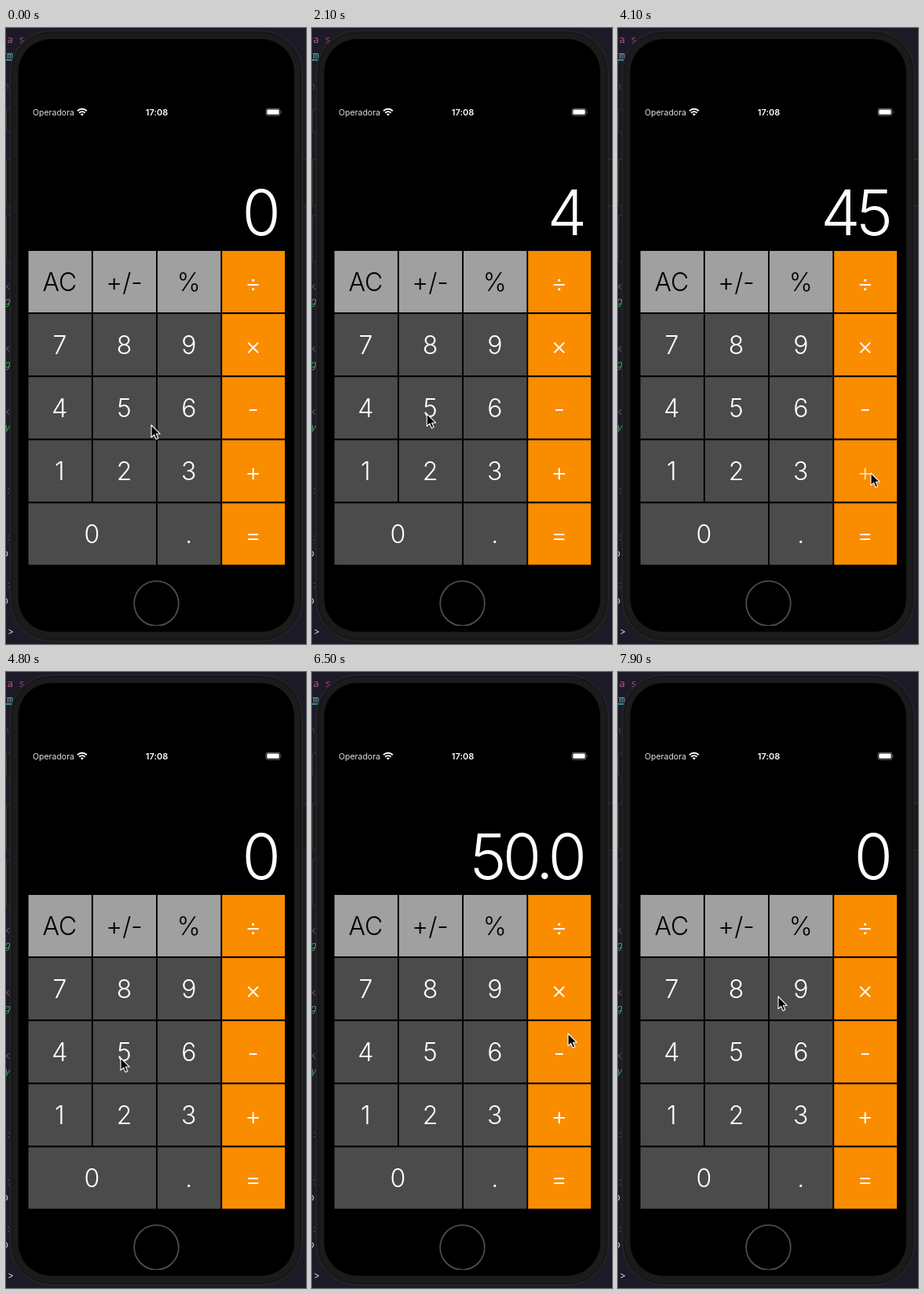
Write an HTML page that moves like this. It is 382 px wide and 782 px high and loops after 8000 ms.

```html
<!DOCTYPE html>
<html lang="pt">
<head>
<meta charset="utf-8">
<title>Calculadora</title>
<style>
  html, body { margin: 0; width: 100%; height: 100%; overflow: hidden; background: #1d1a27; }
  svg { display: block; width: 382px; height: 782px; }
  text { font-family: Inter, Roboto, sans-serif; font-variant-ligatures: none; fill: #fff; }
  #code text { font: 13px "Noto Sans Mono", "DejaVu Sans Mono", monospace; }
  .key { font-size: 32px; font-weight: 300; text-anchor: middle; }
  #display { font-size: 80px; font-weight: 300; letter-spacing: -5px; text-anchor: end; }
  .status { font-size: 10.5px; fill: #e2e2e2; }
  .clock { font-size: 11px; font-weight: 600; text-anchor: middle; }
</style>
</head>
<body>
<svg viewBox="0 0 382 782" xmlns="http://www.w3.org/2000/svg">
  <rect width="382" height="782" fill="#1d1a27"/>
  <g id="code"></g>

  <g id="sideButtons" fill="#19191b" stroke="#37363b"></g>
  <rect x="5.5" y="3.5" width="372" height="775" rx="52" fill="#1b1b1c" stroke="#29292b"/>
  <rect x="8" y="6" width="367" height="770" rx="50" fill="none" stroke="#141415"/>
  <rect x="15.5" y="14" width="351.5" height="752.5" rx="42" fill="#000"/>

  <text class="status" x="34" y="110.7">Operadora</text>
  <g fill="none" stroke="#fff" stroke-width="1.9">
    <path d="M91 105.2a8.4 8.4 0 0 1 11.8 0"/>
    <path d="M93.2 107.7a5.3 5.3 0 0 1 7.4 0"/>
  </g>
  <path d="M94.9 109.4a2.9 2.9 0 0 1 4 0l-2 2.2z" fill="#fff"/>
  <text class="clock" x="192" y="110.8">17:08</text>
  <rect x="331" y="102.3" width="18" height="8.8" rx="2.4" fill="none" stroke="#777" stroke-width=".9"/>
  <rect x="332.3" y="103.6" width="15.4" height="6.2" rx="1.3" fill="#fff"/>
  <path d="M350.2 105.2q1.3 1.5 0 3z" fill="#888"/>

  <text id="display" x="345" y="262.5">0</text>
  <g id="keys"></g>
  <circle cx="191.5" cy="730.5" r="28.3" fill="none" stroke="#4c4c4c" stroke-width="1.8"/>
  <rect x="175" y="759" width="33" height="3" fill="#000"/>

  <path id="cursor" d="M0 0V15.6L3.6 12.3L6.1 18L8.8 16.8L6.4 11.3H11.3Z"
        fill="#000" stroke="#fff" stroke-width="1.1" stroke-linejoin="round"/>
</svg>
<script>
const NS = "http://www.w3.org/2000/svg";
const LOOP = 8000, STEP = 100;
const $ = id => document.getElementById(id);

function add(parent, tag, attrs, label) {
  const el = document.createElementNS(NS, tag);
  for (const name in attrs) el.setAttribute(name, attrs[name]);
  if (label) el.textContent = label;
  parent.appendChild(el);
  return el;
}

// Scraps of the editor visible beside the phone: text, right edge, baseline, colour, style
[
  ["va", 9, 19, "#b0568f"], ["s", 24, 19, "#8d4a78"],
  ["rm", 9, 39, "#62b3c4", "underline"],
  ["n", 4, 78, "#44424e"],
  ["k", 5, 332, "#5a5866"], ["g", 5, 351, "#3fa65a", "italic"],
  ["k", 5, 411, "#5a5866"], ["g", 5, 431, "#3fa65a", "italic"],
  ["k", 5, 491, "#5a5866"], ["y", 5, 511, "#3fa65a", "italic"],
  [":", 7, 591, "#55535f"], [":", 7, 651, "#55535f"],
  ["o", 3, 671, "#d0d0d0"], [":", 7, 711, "#55535f"],
  ["o", 3, 731, "#d0d0d0"], [">", 10, 771, "#e4e4e4"]
].forEach(([label, x, y, color, look]) => {
  const el = add($("code"), "text", { x, y, "text-anchor": "end" }, label);
  el.style.fill = color;
  if (look === "italic") el.style.fontStyle = look;
  if (look === "underline") el.style.textDecoration = look;
});

[[0.5, 103, 29], [0.5, 167, 59], [0.5, 238, 59], [376.5, 167, 59]].forEach(([x, y, height]) =>
  add($("sideButtons"), "rect", { x, y, width: 8, height, rx: 2 }));

const labels = {};
const rows = ["AC +/- % ÷", "7 8 9 ×", "4 5 6 -", "1 2 3 +", "0 . ="];
rows.forEach((row, r) => {
  const top = 283 + r * 80.1;
  let col = 0;
  row.split(" ").forEach(name => {
    const span = name === "0" ? 2 : 1;
    const isOp = col === 3;
    const x = 28.6 + col * 82.2, width = span * 82.2 - 1.9 - (isOp ? 0.4 : 0);
    const fill = isOp ? "#fa8c00" : r === 0 ? "#a0a0a0" : "#4b4b4b";
    add($("keys"), "rect", { x, y: top, width, height: 78, fill });
    labels[name] = add($("keys"), "text",
      { class: "key", x: x + width / 2 - 0.4, y: top + (isOp ? 52 : 50.6) }, name);
    if (r === 0 && !isOp) labels[name].style.fill = "#000";
    col += span;
  });
});

// Pointer stops: time, x, y
const path = [
  [0, 185, 504], [800, 185, 504], [1200, 60, 486], [1400, 58, 485], [1600, 62, 486],
  [2000, 146, 490], [2600, 149, 489], [2700, 153, 488], [2900, 262, 480],
  [3200, 320, 329], [3600, 328, 631], [3900, 322, 567], [4100, 322, 565], [4500, 321, 564],
  [4800, 146, 490], [5100, 144, 490], [5400, 284, 630], [5500, 305, 650],
  [5700, 308, 657], [6000, 310, 650], [6300, 315, 631], [6500, 326, 459],
  [6800, 318, 330], [7200, 314, 467], [7400, 314, 467], [7800, 206, 413], [7900, 204, 412]
];

// Presses: time, key, reading shown afterwards
const presses = [
  [1400, "4", "4"], [2200, "5", "45"], [4100, "+", "0"],
  [4900, "5", "5"], [5500, "=", "50.0"], [7300, "-", "0"]
];
const FADE = [0.66, 0.66, 0.85];

function pointerAt(t) {
  const i = path.findIndex(p => p[0] > t);
  if (i < 0) return path[path.length - 1].slice(1);
  const [t0, x0, y0] = path[i - 1], [t1, x1, y1] = path[i];
  const u = (t - t0) / (t1 - t0), e = u * u * (3 - 2 * u);
  return [x0 + (x1 - x0) * e, y0 + (y1 - y0) * e];
}

function draw(t) {
  let reading = "0";
  for (const name in labels) labels[name].style.opacity = 1;
  for (const [time, name, value] of presses) {
    const age = t - time;
    if (age < 0) break;
    if (age >= STEP) reading = value;
    const dim = FADE[age / STEP];
    if (dim) labels[name].style.opacity = dim;
  }
  $("display").textContent = reading;
  $("cursor").setAttribute("transform", `translate(${pointerAt(t)})`);
}

const start = performance.now();
function tick() {
  const t = (performance.now() - start) % LOOP;
  draw(Math.floor(t / STEP) * STEP);
  requestAnimationFrame(tick);
}
tick();
</script>
</body>
</html>
```
